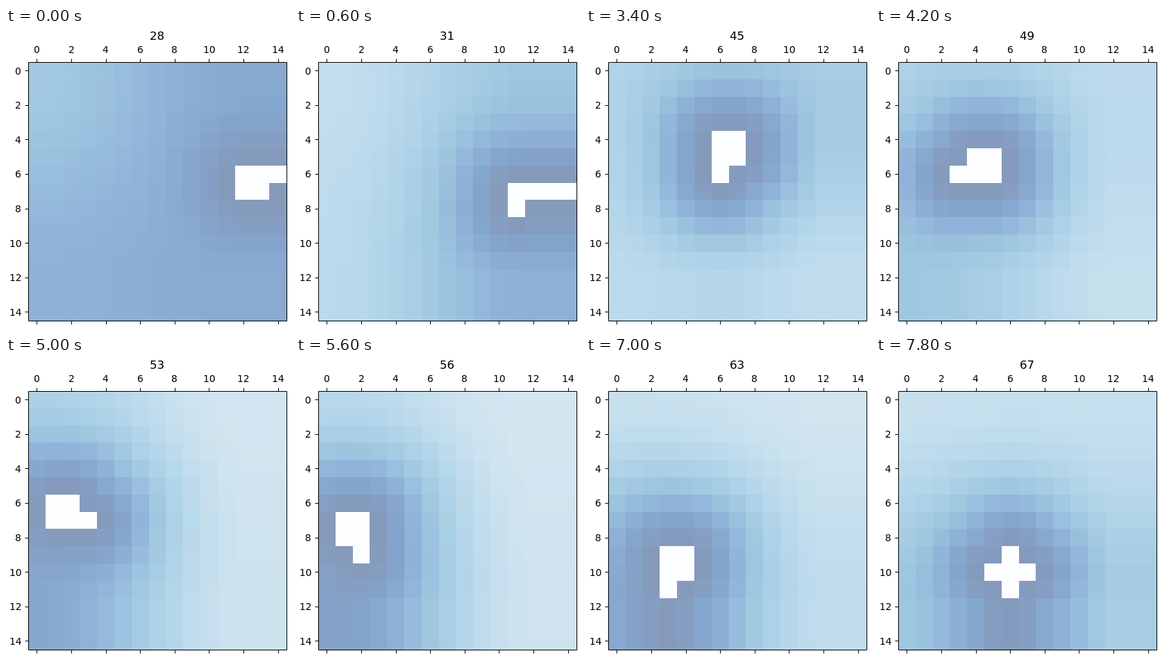
An HTML page for the animation above (8 s loop, 409 by 433 pixels).

```html
<!DOCTYPE html>
<html lang="en">
<head>
<meta charset="utf-8">
<title>Heat grid</title>
<style>
  html, body { margin: 0; width: 100%; height: 100%; overflow: hidden; background: #fff; }
  svg { display: block; width: 100%; height: 100%; }
  text { font: 13.89px "DejaVu Sans", sans-serif; fill: #000; }
  #title { font-size: 16.67px; }
  .axis { fill: none; stroke: #000; stroke-width: 1; }
</style>
</head>
<body>
<svg id="stage" viewBox="0 0 409 433">
  <g id="cells" shape-rendering="crispEdges"></g>
  <path id="axes" class="axis"/>
  <text id="title" x="207" y="17"></text>
</svg>
<script>
const N = 15, LAST = 12, CELL = 24.8, X0 = 32, Y0 = 49;
const STEP = 200, STEPS = 40, FIRST = 28, DIGIT = 8.84;
const SVG = 'http://www.w3.org/2000/svg';
const stage = document.getElementById('stage');
const title = document.getElementById('title');

// Colour ramp, from next to the blob to far away
const ramp = ['#8698b7', '#84a4cc', '#91b5da', '#9fc7e0', '#aed2e7', '#bddbed', '#cde3ee', '#dae8f2']
  .map(hex => [1, 3, 5].map(i => parseInt(hex.slice(i, i + 2), 16)));

// Blob centre (row, column) and background level in the four corners
const keys = [
  { at: 0, pos: [6.4, 12], far: [4.2, 2.3, 2.8, 2.4] },
  { at: 3, pos: [7.3, 11.4], far: [6.4, 4, 5.8, 3] },
  { at: 9, pos: [6.4, 8.3], far: [6, 5.2, 5.6, 4] },
  { at: 17, pos: [4.7, 6.4], far: [5.2, 4.7, 6, 6.3] },
  { at: 25, pos: [6.6, 1.7], far: [5.2, 7.5, 2.2, 7] },
  { at: 32, pos: [9.7, 1.4], far: [6.7, 7.9, 1.5, 7.2] },
  { at: 39, pos: [10, 6], far: [6.7, 6.6, 4.2, 5.1] }
];

const mix = (a, b, t) => a + (b - a) * t;
const mixAll = (a, b, t) => a.map((v, i) => mix(v, b[i], t));
const smooth = t => t * t * (3 - 2 * t);

function add(name, attrs, parent = stage) {
  const el = document.createElementNS(SVG, name);
  for (const k in attrs) el.setAttribute(k, attrs[k]);
  return parent.appendChild(el);
}

// Cells past LAST repeat its value
const grid = Array.from({ length: N * N }, (_, i) => {
  const row = Math.floor(i / N), col = i % N;
  const x = Math.round(X0 + col * CELL), y = Math.round(Y0 + row * CELL);
  const el = add('rect', {
    x, y,
    width: Math.round(X0 + (col + 1) * CELL) - x,
    height: Math.round(Y0 + (row + 1) * CELL) - y
  }, document.getElementById('cells'));
  return { el, row, col, r: Math.min(row, LAST), c: Math.min(col, LAST) };
});

let axes = 'M32.5 49.5H404.5V421.5H32.5Z';
for (let i = 0; i < N; i += 2) {
  const x = X0 + (i + 0.5) * CELL, y = Y0 + (i + 0.5) * CELL;
  const px = Math.round(x) + 0.5, py = Math.floor(y + 0.2) + 0.5;
  const width = String(i).length * DIGIT;
  axes += `M${px} 44.5V49M${px} 421.5V426.5M27.5 ${py}H32`;
  add('text', { x: Math.round(x - width / 2), y: 36 }).textContent = i;
  add('text', { x: Math.round(22.3 - width), y: Math.round(y + 5.2) }).textContent = i;
}
document.getElementById('axes').setAttribute('d', axes);

function stateAt(step) {
  let i = 0;
  while (i < keys.length - 2 && step >= keys[i + 1].at) i++;
  const a = keys[i], b = keys[i + 1];
  const t = (step - a.at) / (b.at - a.at);
  return { pos: mixAll(a.pos, b.pos, t), far: mixAll(a.far, b.far, t) };
}

function farLevel([tl, tr, bl, br], { r, c }) {
  const u = smooth(c / LAST), v = smooth(r / LAST);
  return mix(mix(tl, tr, u), mix(bl, br, u), v);
}

function colour(level) {
  const i = Math.min(Math.floor(level), ramp.length - 2);
  return `rgb(${mixAll(ramp[i], ramp[i + 1], level - i).map(Math.round)})`;
}

function draw(step) {
  const { pos, far } = stateAt(step);
  const reach = p => (p.r - pos[0]) ** 2 + (p.c - pos[1]) ** 2;
  const blob = [...grid].sort((a, b) => reach(a) - reach(b)).slice(0, 5);
  for (const p of grid) {
    let fill = '#fdfeff';
    if (!blob.includes(p)) {
      const d = Math.max(1, Math.min(...blob.map(b => Math.hypot(p.r - b.row, p.c - b.col))));
      const top = farLevel(far, p);
      const width = 1.7 + 0.4 * top;
      fill = colour((top - 1) * (1 - Math.exp(-((d / width) ** 2))));
    }
    p.el.setAttribute('fill', fill);
  }
  title.textContent = FIRST + step;
}

let start, shown = -1;
function tick(now) {
  start ??= now;
  const step = Math.floor(Math.max(0, now - start) / STEP) % STEPS;
  if (step !== shown) draw(shown = step);
  requestAnimationFrame(tick);
}
draw(0);
requestAnimationFrame(tick);
</script>
</body>
</html>
```
